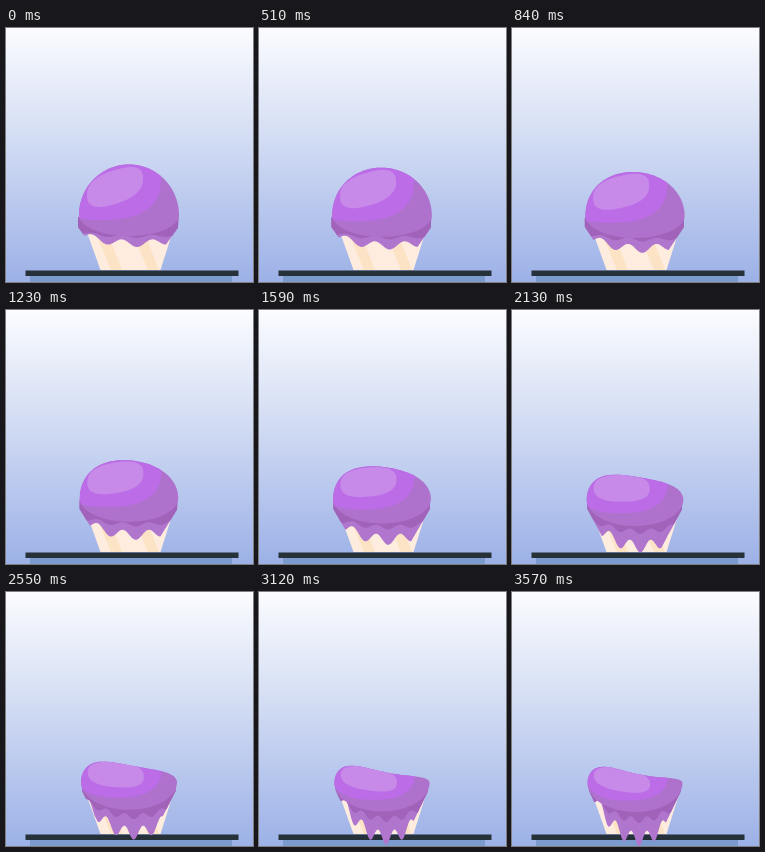
Animation of 247x254 px, one loop 3.6 s. Source, as an HTML page with a canvas:

```html
<!DOCTYPE html>
<html>
<head>
<meta charset="utf-8">
<title>Melting ice cream</title>
<style>
html, body { margin: 0; width: 100%; height: 100%; overflow: hidden; }
canvas { display: block; }
</style>
</head>
<body>
<canvas id="stage" width="247" height="254"></canvas>
<script>
const ctx = document.getElementById('stage').getContext('2d');
const LOOP = 3600;
const { PI, abs, cos, sin, min, sign } = Math;

let melt = 0; // 0 = frozen, 1 = melted
const mix = (frozen, melted) => frozen + (melted - frozen) * melt;

const sky = ctx.createLinearGradient(0, 0, 0, 254);
sky.addColorStop(0, '#fbfcff');
sky.addColorStop(0.4, '#d6dff4');
sky.addColorStop(1, '#9cb1e7');

function rect(color, x, y, w, h) {
  ctx.fillStyle = color;
  ctx.fillRect(x, y, w, h);
}

function fillPath(color, points) {
  ctx.beginPath();
  points.forEach(point => ctx.lineTo(...point));
  ctx.closePath();
  ctx.fillStyle = color;
  ctx.fill();
}

// Closed outline sampled by angle; pointAt gets the cosine and sine.
const ring = pointAt => Array.from({ length: 120 }, (_, i) => {
  const angle = i / 60 * PI;
  return pointAt(cos(angle), sin(angle));
});

// Cream hanging from the rim in waves that draw together as they run down.
function skirt(color, depth, sag, wave) {
  const left = mix(72, 77), right = mix(172.5, 169), top = mix(189, 193);
  const points = [[right, top], [left, top]];
  for (let x = left; x <= right; x += 0.5) {
    const k = (x - mix(131, 127)) / mix(30, 15.5);
    const side = 199 + mix(1.4, 2.1) * min(x - left, right - x);
    const hang = depth - sag * k * k - wave * (1 - cos(2 * PI * k)) / 2;
    points.push([x, min(side, hang)]);
  }
  fillPath(color, points);
}

// The round top sinks into a lopsided, sagging one.
function scoop(color) {
  fillPath(color, ring((u, v) => {
    const height = v > 0 ? mix(50.5, 9.5 - 11 * u + 11 * u * u) : mix(21, 29);
    return [123 + mix(50, 47.5) * u, mix(187, 191) - height * v];
  }));
}

// Slightly squared oval with a sheared axis.
function oval(color, x, y, rx, ry, slope) {
  const square = n => sign(n) * abs(n) ** 0.8;
  fillPath(color, ring((u, v) => {
    const dx = rx * square(u);
    return [x + dx, y + slope * dx + ry * square(v)];
  }));
}

function draw(now) {
  const t = (now % LOOP / LOOP) ** 0.93;
  melt = t * t * (3 - 2 * t);

  rect(sky, 0, 0, 247, 254);
  rect('#7b9acd', 24, 248, 202, 6);
  fillPath('#feecdf', [[78, 196], [94.5, 242], [154.5, 242], [169, 196]]);
  for (const x of [86, 123]) {
    fillPath('#fde3c6', [[x, 196], [x + 12, 196], [x + 30, 242], [x + 19, 242]]);
  }
  rect('#263139', 19.5, 242.5, 213, 5.5);

  skirt('#b075cd', mix(219, 254), mix(2.5, 5), mix(7, 14));
  skirt('#a163ba', mix(210, 231), mix(1, 2.5), mix(3, 6));
  ctx.save();
  scoop('#ae72cd');
  ctx.clip();
  oval('#bc6ce6', mix(95, 115), mix(150, 182), mix(60, 41), mix(42, 26.5), 0);
  oval('#c78ae9', mix(109, 110), mix(159, 188), 28, mix(17, 11.5), mix(-0.3, 0.16));
  ctx.restore();
}

function tick() {
  draw(performance.now());
  requestAnimationFrame(tick);
}
tick();
</script>
</body>
</html>
```
